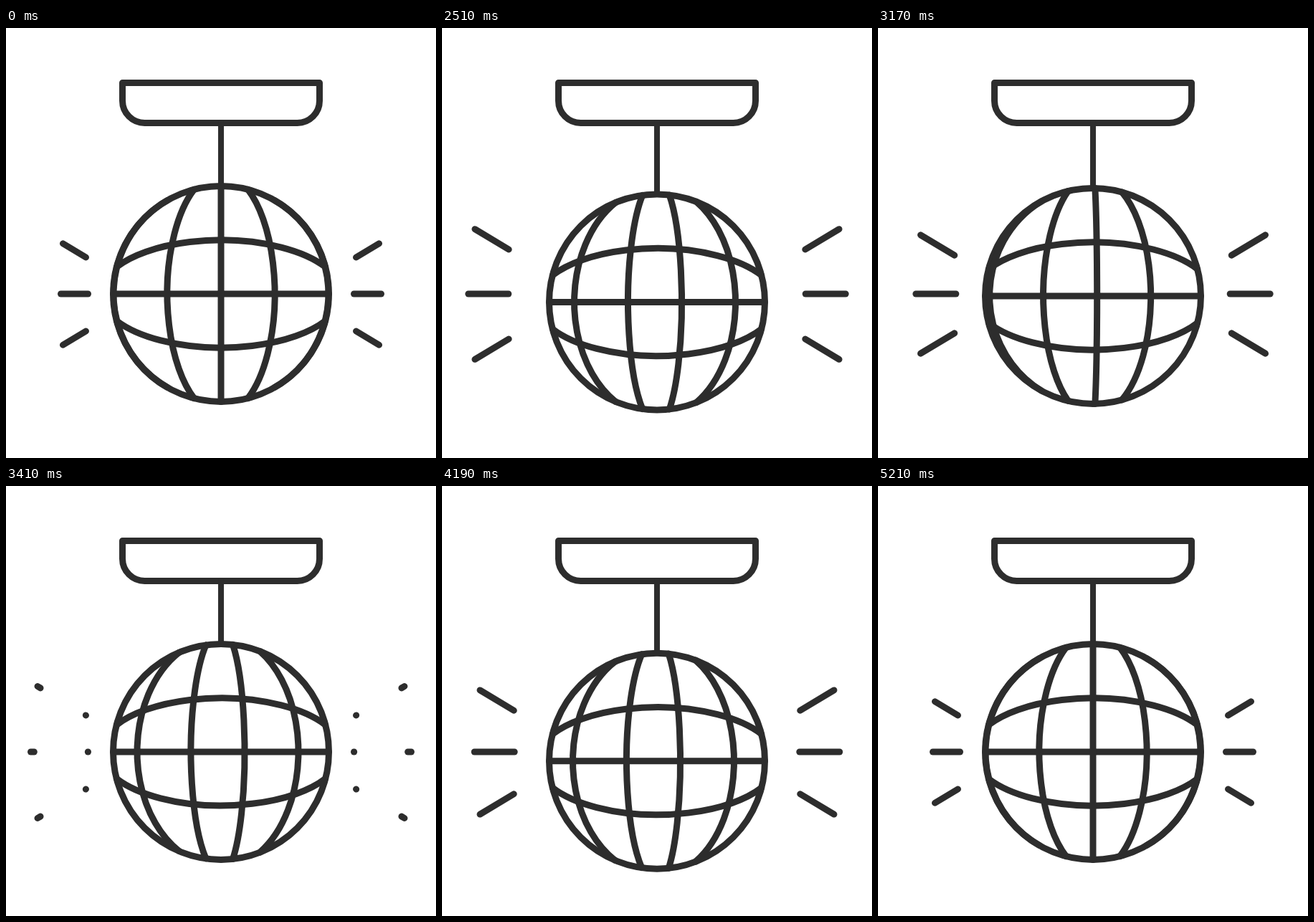
An HTML page with a canvas for the animation above (5240 ms loop, 600 by 600 pixels).

```html
<!DOCTYPE html>
<html lang="en">
<head>
<meta charset="utf-8">
<title>Mirror ball</title>
<style>
  html, body { margin: 0; width: 100%; height: 100%; overflow: hidden; background: #fff; }
  canvas { display: block; width: 600px; height: 600px; }
</style>
</head>
<body>
<canvas id="stage" width="600" height="600"></canvas>
<script>
const ctx = document.getElementById('stage').getContext('2d');

const LOOP = 5240, HOLD = 2030, STEP = 30, BEGIN = 2000;
const CX = 300, CY = 371, R = 150.5, GAP = 75;
const DASH = 56, PERIOD = 131;

// Keys are [time, value]; the first slope is given, the last one is zero.
const bob = [[BEGIN, 0], [2540, 12], [2670, 13.8], [2930, 9], [3080, 5.2], [3385, -0.3],
  [3635, 5.3], [3860, 12], [4030, 14], [4180, 12.8], [4580, 4], [4700, 2], [4920, 0.5], [5210, 0]];
const spin = [[BEGIN, 0], [2930, 101], [3410, 192], [3860, 285], [4580, 397], [5210, 450]];
const flow = [[BEGIN, 38], [2540, 81], [2930, 132.2], [3410, 262.2], [3860, 382.5],
  [4580, 533.5], [5210, 562]];

const rate = (p, q) => (q[1] - p[1]) / (q[0] - p[0]);

function slope(keys, i, first) {
  if (i === 0) return first;
  if (i === keys.length - 1) return 0;
  const a = keys[i - 1], b = keys[i], c = keys[i + 1];
  return (rate(a, b) * (c[0] - b[0]) + rate(b, c) * (b[0] - a[0])) / (c[0] - a[0]);
}

// Smooth curve through the keys
function curve(keys, t, first) {
  let i = 0;
  while (i < keys.length - 2 && t > keys[i + 1][0]) i++;
  const [t0, v0] = keys[i], [t1, v1] = keys[i + 1];
  const h = t1 - t0, u = Math.min(1, Math.max(0, (t - t0) / h)), w = 1 - u;
  return v0 * w * w * (1 + 2 * u) + v1 * u * u * (3 - 2 * u) +
    h * u * w * (slope(keys, i, first) * w - slope(keys, i + 1, first) * u);
}

function line(x1, y1, x2, y2) {
  ctx.beginPath();
  ctx.moveTo(x1, y1);
  ctx.lineTo(x2, y2);
  ctx.stroke();
}

function arc(cy, rx, ry, mid) {
  ctx.beginPath();
  ctx.ellipse(CX, cy, rx, ry, 0, mid - Math.PI / 3, mid + Math.PI / 3);
  ctx.stroke();
}

// Long radius of the arc whose tips lie on the ball's outline
const reach = o => Math.sqrt((R * R - o * o / 4) / 0.75);

function drawMount(top) {
  ctx.beginPath();
  ctx.moveTo(162.5, 76.5);
  ctx.lineTo(437.5, 76.5);
  ctx.arcTo(437.5, 132.5, 300, 132.5, 31);
  ctx.arcTo(162.5, 132.5, 162.5, 76.5, 31);
  ctx.closePath();
  ctx.stroke();
  ctx.lineWidth = 8;
  line(CX, 132.5, CX, top);
  ctx.lineWidth = 9;
}

function drawBall(cy, shift) {
  ctx.beginPath();
  ctx.arc(CX, cy, R, 0, Math.PI * 2);
  ctx.stroke();
  line(CX - R, cy, CX + R, cy);
  for (const side of [-1, 1]) arc(cy, reach(GAP), GAP, side * Math.PI / 2);
  for (let k = -2; k <= 3; k++) {
    const o = k * GAP - shift % GAP;
    if (Math.abs(o) < R) arc(cy, Math.abs(o), reach(o), o < 0 ? Math.PI : 0);
  }
}

function drawRay(x1, y1, x2, y2, from, to) {
  const at = s => [x1 + (x2 - x1) * s / 80, y1 + (y2 - y1) * s / 80];
  line(...at(from), ...at(to));
}

function drawRays(head) {
  for (let h = head % PERIOD; h - DASH < 80; h += PERIOD) {
    const from = Math.max(0, h - DASH), to = Math.min(80, h);
    if (to <= from) continue;
    for (const side of [-1, 1]) {
      drawRay(CX + side * 185.5, CY, CX + side * 265.5, CY, from, to);
      for (const v of [-1, 1])
        drawRay(CX + side * 188.5, 371.5 + v * 51.5, CX + side * 256, 371.5 + v * 92, from, to);
    }
  }
}

function draw(now) {
  const time = now % LOOP;
  const t = time < HOLD ? BEGIN : HOLD + Math.floor((time - HOLD) / STEP) * STEP;
  const cy = CY + curve(bob, t, 0.004);

  ctx.fillStyle = '#fff';
  ctx.fillRect(0, 0, 600, 600);
  ctx.strokeStyle = '#2d2d2d';
  ctx.lineWidth = 9;
  ctx.lineCap = ctx.lineJoin = 'round';

  drawMount(cy - R);
  drawBall(cy, curve(spin, t, 0.03));
  drawRays(curve(flow, t, 0.03));
}

let start = null;
function tick(now) {
  if (start === null) start = now;
  draw(now - start);
  requestAnimationFrame(tick);
}
draw(0);
requestAnimationFrame(tick);
</script>
</body>
</html>
```
